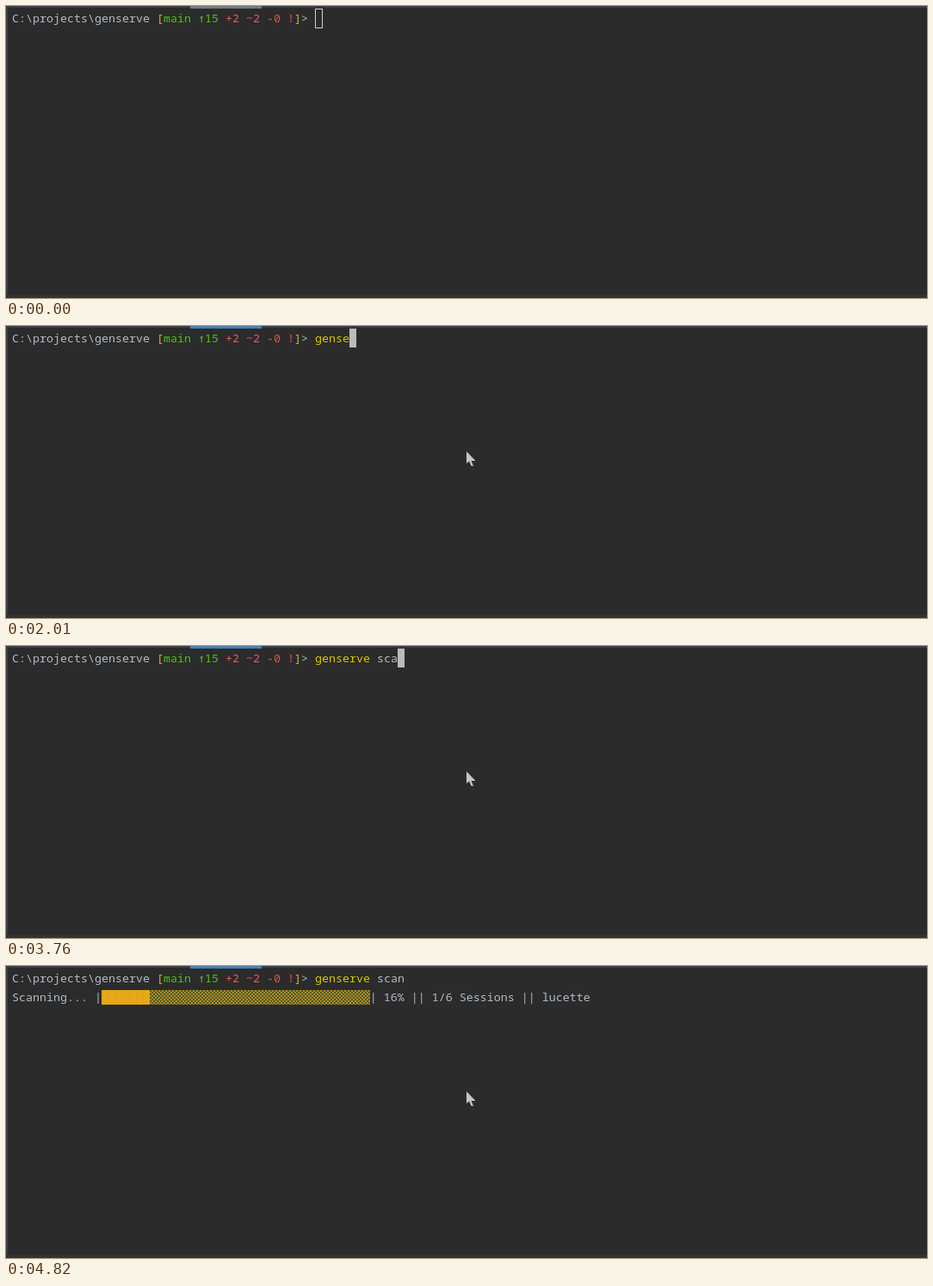
Write an HTML page that moves like this. It is 1070 px wide and 340 px high and loops after 8000 ms.

```html
<!DOCTYPE html>
<html lang="en">
<head>
<meta charset="utf-8">
<title>Terminal scan</title>
<style>
html, body { margin: 0; width: 100%; height: 100%; overflow: hidden; background: #2b2b2b; }
#stage { position: relative; width: 1070px; height: 340px; overflow: hidden; background: #2b2b2b; }
#stage > * { position: absolute; box-sizing: border-box; }
.line {
  left: 7px; height: 22px; white-space: pre; color: #b0bdc8;
  font: 500 13.333px/22px "Noto Sans Mono", "DejaVu Sans Mono", monospace;
  font-variant-ligatures: none;
}
.arrow { font-family: "DejaVu Sans Mono", monospace; line-height: 1; }
.frame { inset: 0; border: solid #3c3f41; border-width: 2px 0 0 2px; }
.base { left: 0; right: 0; bottom: 0; height: 4px; background: #353234; }
#tab { left: 214px; top: 0; width: 83px; height: 3px; }
#caret { width: 9px; height: 23px; border: 1px solid #d0d0d0; }
#caret.solid { width: 8px; height: 22px; border: 0; background: #bbb; }
.bar { left: 111px; top: 28px; width: 312px; height: 17px;
  background: repeating-conic-gradient(#b9861d 0 25%, #465f2a 0 50%) 0 0 / 4px 4px; }
#fill { height: 100%; background: repeating-linear-gradient(90deg, #d8a41c 0 1px, #e6a817 0 8px); }
.y { color: #e0b030 } .g { color: #4fc414 } .r { color: #ff5350 } .d { color: #d8534a } .c { color: #d6c800 }
</style>
</head>
<body>
<div id="stage">
  <div class="frame"></div>
  <div class="base"></div>
  <div id="tab"></div>
  <div class="line" style="top:3px">C:\projects\genserve <span class="y">[</span><span class="g">main <span class="arrow">↑</span>15</span> <span class="r">+2 ~2</span> <span class="d">-0 !</span><span class="y">]</span>&gt; <span class="c" id="command"></span><span id="arg"></span></div>
  <div class="line" style="top:25px" id="status"></div>
  <div class="bar" id="bar"><div id="fill"></div></div>
  <div id="caret"></div>
  <svg id="mouse" width="12" height="18" style="left:0;top:0"><path d="M0 0V14L3 11.5L5.5 17H8L5.5 11H10.5Z" fill="#c6c6c6"/></svg>
</div>
<script>
const LOOP = 8000, CELL = 8, FOCUS = 680, ENTER = 4350, SCAN = 4620, FIRST = 4820;
const typed = "genserve scan";
const keyTimes = [1400, 1530, 1660, 1810, 2010, 2540, 2880, 2950, 3020, 3290, 3560, 3760, 3890];
const $ = id => document.getElementById(id);
const [tab, command, arg, status_, bar, fill, caret, mouse] =
  ["tab", "command", "arg", "status", "bar", "fill", "caret", "mouse"].map($);

function setText(el, text) {
  if (el.textContent !== text) el.textContent = text;
}

function drawMouse(t) {
  // The pointer advances in 70 ms samples, slowing into its resting place.
  const step = Math.min(6, Math.floor((t - 120) / 70));
  const left = (1 - step / 6) ** 2;
  const x = Math.round(535 + 460 * left);
  const y = Math.round((t < 610 ? 147 : 146) + 180 * left);
  mouse.style.display = t < 120 ? "none" : "block";
  mouse.style.transform = `translate(${x}px, ${y}px)`;
}

function drawInput(t) {
  const count = keyTimes.filter(k => t >= k).length;
  const focused = t >= FOCUS, entered = t >= ENTER;
  setText(command, typed.slice(0, Math.min(count, 8)));
  setText(arg, typed.slice(8, Math.max(count, 8)));
  tab.style.background = focused ? "#4a7fae" : "#747a80";
  caret.className = focused ? "solid" : "";
  caret.style.display = t < SCAN ? "block" : "none";
  caret.style.left = (entered ? 7 : 359 + count * CELL) + "px";
  caret.style.top = (entered ? 25 : 3) + "px";
}

function drawProgress(t) {
  const found = t >= FIRST;
  const tail = found ? "16% || 1/6 Sessions || lucette" : "0% || 0/6 Sessions || ";
  setText(status_, t < SCAN ? "" : "Scanning... |" + " ".repeat(39) + "| " + tail);
  bar.style.display = t < SCAN ? "none" : "block";
  fill.style.width = (found ? 7 * CELL : 0) + "px";
}

const start = performance.now();
function draw() {
  const t = (performance.now() - start) % LOOP;
  drawMouse(t);
  drawInput(t);
  drawProgress(t);
  requestAnimationFrame(draw);
}
draw();
</script>
</body>
</html>
```
